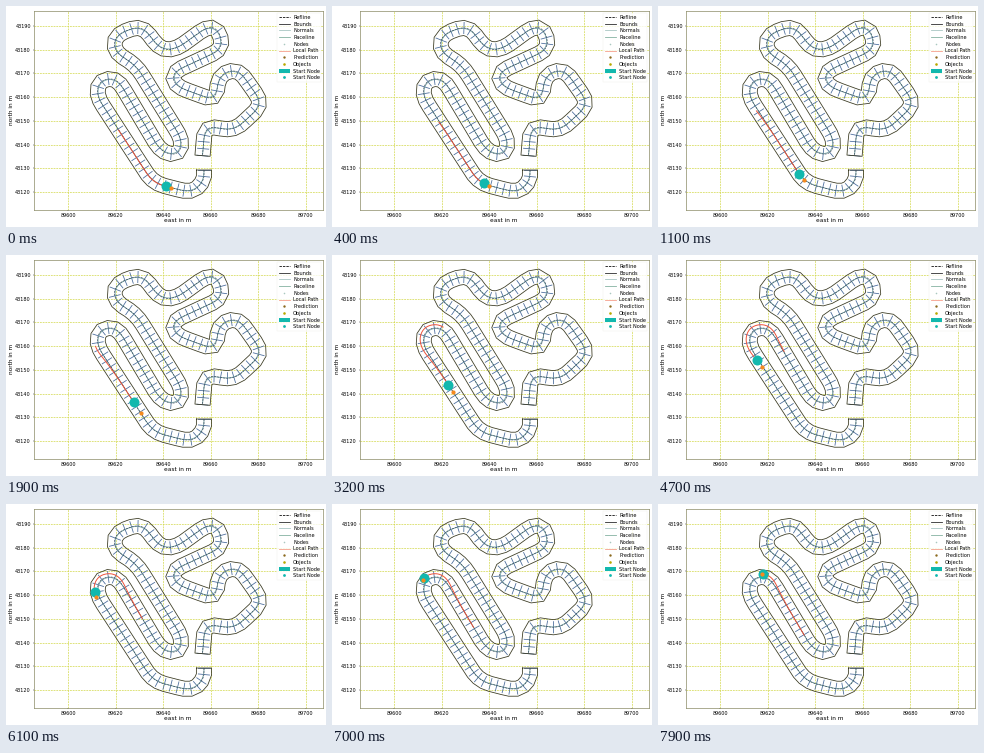
A matplotlib script that plays this animation: 320x221 px, repeating every 8000 ms.

```python
import numpy as np
import matplotlib.pyplot as plt
from matplotlib.animation import FuncAnimation
from matplotlib.patches import Rectangle

W, H, DPI = 320, 221, 64
PX = 72 / DPI                      # points per pixel
FRAMES, STEP = 80, 100
HALF, TICK, PITCH = 7.6, 5.6, 6.8  # track half width, normal half length, spacing

TEAL, RED, ORANGE = "#12b8ae", "#ee4f36", "#f58a1f"
BLUE, INK, GRID = "#4a6c9c", "#3a3a22", "#d2d84a"

# corners of the track, rounded off below
CORNERS = [
    (198, 164), (198, 175), (186, 187), (147, 177), (90, 89), (94, 74),
    (111, 72), (155, 146), (172, 149.5), (177, 135), (130, 59), (108, 46),
    (109, 29), (136, 19), (154, 43.5), (170, 43.5), (202, 20), (213, 24),
    (217, 43), (166, 66.5), (169, 80), (210, 95), (212.5, 69), (232, 62.5),
    (257, 98), (228, 125), (199, 119.5), (196.5, 150)]


def rounded(corners, trim=12):
    """Polyline with each corner replaced by a quadratic curve."""
    p = np.array(corners, float)
    t = np.linspace(0, 1, 12)[:, None]
    out = [p[:1]]
    for a, b, c in zip(p, p[1:], p[2:]):
        la, lc = np.hypot(*(a - b)), np.hypot(*(c - b))
        start = b + (a - b) * min(trim / la, 0.5)
        end = b + (c - b) * min(trim / lc, 0.5)
        out.append((1 - t)**2 * start + 2 * t * (1 - t) * b + t**2 * end)
    return np.vstack(out + [p[-1:]])


def resample(xy, step=0.5):
    s = np.r_[0, np.cumsum(np.hypot(*np.diff(xy, axis=0).T))]
    u = np.arange(0, s[-1], step)
    return u, np.c_[np.interp(u, s, xy[:, 0]), np.interp(u, s, xy[:, 1])]


def smooth(xy, width):
    k = np.hanning(width)
    ext = np.pad(xy, ((width // 2, width // 2), (0, 0)), mode="edge")
    return np.c_[[np.convolve(c, k / k.sum(), "valid") for c in ext.T]].T


def normals(xy):
    d = np.gradient(xy, axis=0)
    d /= np.hypot(*d.T)[:, None]
    return np.c_[-d[:, 1], d[:, 0]]


fig = plt.figure(figsize=(W / DPI, H / DPI), dpi=DPI, facecolor="white")

# map axes
ax = fig.add_axes([27.5 / W, 1 - 203.8 / H, 289 / W, 198.8 / H])
ax.set_xlim(89600 + (27.5 - 62) / 2.375, 89600 + (316.5 - 62) / 2.375)
ax.set_ylim(43120 - (203.8 - 186) / 2.371, 43120 + (186 - 5) / 2.371)
ax.set_xticks(range(89600, 89701, 20))
ax.set_yticks(range(43120, 43191, 10))
ax.ticklabel_format(useOffset=False, style="plain")
ax.tick_params(labelsize=4.9 * PX, length=1.3 * PX, width=0.4 * PX, pad=1.4 * PX)
ax.tick_params(axis="x", pad=2 * PX)
ax.set_axisbelow(True)
ax.grid(color=GRID, lw=0.7 * PX, ls=(0, (2.6, 1.3)))
for side in ax.spines.values():
    side.set(linewidth=0.6 * PX, color="#77774c")

# drawing layer in pixels
cv = fig.add_axes([0, 0, 1, 1])
cv.set_xlim(0, W)
cv.set_ylim(H, 0)
cv.axis("off")


def line(x, y, color, lw, **kw):
    return cv.plot(x, y, color=color, lw=lw * PX, **kw)[0]


def dot(x, y, color, size, **kw):
    return cv.plot([x], [y], "o", color=color, ms=size * PX, mew=0, **kw)[0]


def text(x, y, s, size, **kw):
    cv.text(x, y, s, fontsize=size * PX, family="DejaVu Sans", **kw)


text(172, 215, "east in m", 5.9, ha="center", va="center")
text(5.3, 104, "north in m", 5.9, ha="center", va="center", rotation=90)

# track
u, mid = resample(rounded(CORNERS))
side = normals(mid)
knots = np.linspace(0, len(u) - 1, int(u[-1] / PITCH) + 1).astype(int)
post, way = mid[knots], side[knots]
for p, n in zip(post, way):
    line(*np.c_[p - TICK * n, p + TICK * n], BLUE, 0.8)
line(*smooth(mid, 45).T, "#6f9fa0", 0.8)
line(*mid.T, "#2c3c50", 0.6, ls=(0, (3.5, 1.6)))
outline = np.vstack([post + HALF * way, (post - HALF * way)[::-1],
                     post[:1] + HALF * way[:1]])
line(*outline.T, INK, 0.8)

# legend
cv.add_patch(Rectangle((270.5, 7), 44, 68.5, fc="white", ec="#e8e8e0",
                       lw=0.35 * PX, alpha=0.8, zorder=5))
ROWS = [("Refline", "black", "--"), ("Bounds", "#222222", "-"),
        ("Normals", "#a4c4c0", "-"), ("Raceline", "#7fae9c", "-"),
        ("Nodes", "#a9c8c0", 1.6), ("Local Path", "#f59a86", "-"),
        ("Prediction", "#8c6a1e", 2.4), ("Objects", "#b8a800", 2.6),
        ("Start Node", TEAL, "bar"), ("Start Node", TEAL, 2.8)]
for i, (name, color, kind) in enumerate(ROWS):
    y = 11 + 6.7 * i
    if kind == "bar":
        cv.add_patch(Rectangle((273, y - 2), 10.5, 4, fc=color, lw=0, zorder=6))
    elif kind in ("-", "--"):
        style = (0, (3, 1.3)) if kind == "--" else "-"
        line([273, 283.5], [y, y], color, 0.8, ls=style, zorder=6)
    else:
        dot(278.2, y, color, kind, zorder=6)
    text(287, y, name, 5, va="center_baseline", zorder=6)

# the driven line swings wide around the left hairpin
apex = u[np.argmin(np.hypot(*(mid - (95, 78)).T))]
swing = 3.6 * np.exp(-((u - apex) / 32)**2)
wide = np.sign(side[np.searchsorted(u, apex)] @ (-1, -1))
s, road = resample(mid + (wide * swing)[:, None] * side)
origin = s[np.argmin(np.hypot(*(road - (160, 181)).T))]

# distance driven, gap to the object behind and planned length ahead
KEYS = [0, 11, 19, 32, 47, 61, 79]
DRIVEN = [0, 26, 48, 69, 99, 121, 149]
BEHIND = [5, 8, 13, 8.5, 8, 5, 1]
AHEAD = [76, 76, 68, 86, 85, 85, 75]


def at(q):
    return np.interp(q, s, road[:, 0]), np.interp(q, s, road[:, 1])


path = line([], [], RED, 0.95, zorder=3)
node = dot(0, 0, TEAL, 10, zorder=3.5)
thing = dot(0, 0, ORANGE, 4.2, zorder=4)


def draw(i):
    # the planner skips about two updates in eleven
    t = i - (i % 11 in (0, 6))
    q = origin + np.interp(t, KEYS, DRIVEN)
    path.set_data(*at(np.linspace(q, q + np.interp(t, KEYS, AHEAD), 80)))
    for mark, d in ((node, q), (thing, q - np.interp(t, KEYS, BEHIND))):
        x, y = at(d)
        mark.set_data([x], [y])
    return path, node, thing


anim = FuncAnimation(fig, draw, frames=FRAMES, interval=STEP, repeat=True, blit=False)
plt.show()
```
